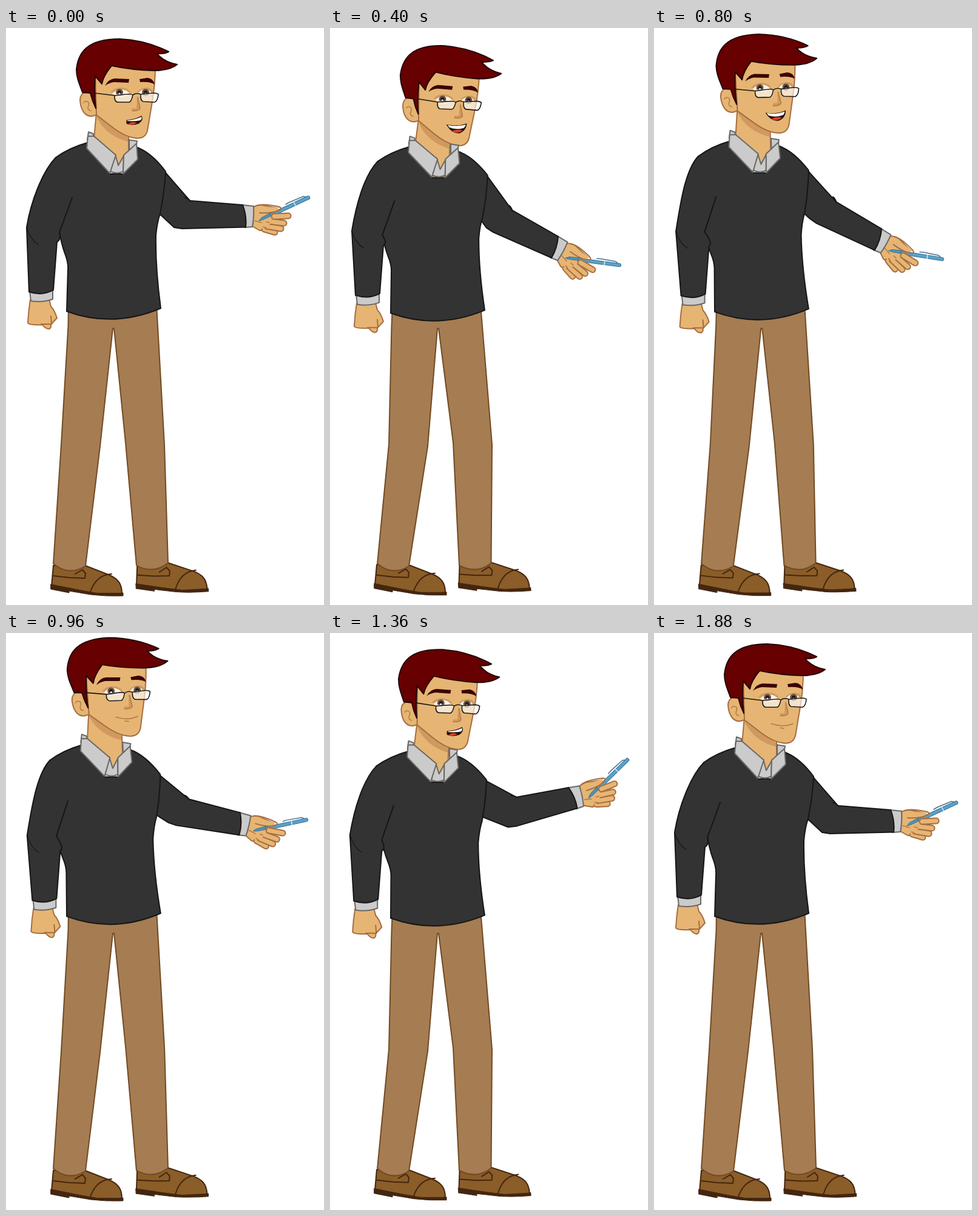
An HTML page for the animation above (1920 ms loop, 524 by 949 pixels).

```html
<!DOCTYPE html>
<html lang="en">
<head>
<meta charset="utf-8">
<title>Presenter</title>
<style>
  html, body { margin: 0; width: 100%; height: 100%; overflow: hidden; background: #fff; }
  svg { display: block; width: 100%; height: 100%; fill: none; stroke-width: 2; stroke-linejoin: round; stroke-linecap: round; }
  .skin { fill: #e6b573; stroke: #a66d40; }
  .patch { fill: #e6b573; }
  .shade { fill: #d0995f; }
  .edge { stroke: #a66d40; }
  .mark { stroke: #b37a48; stroke-width: 1.6; }
  .knit { fill: #333; stroke: #161616; }
  .fold { stroke: #161616; stroke-width: 1.2; }
  .linen { fill: #cbcbcb; stroke: #686868; }
  .cloth { fill: #a67c52; stroke: #714b25; }
  .shoe { fill: #8b5d28; stroke: #432611; }
  .sole { fill: #432611; stroke: #432611; stroke-width: 1; }
  .seam { stroke: #432611; }
  .hair { fill: #670001; stroke: #220606; }
  .brow { fill: #3b0204; }
  .wire { stroke: #1c1816; stroke-width: 1.6; }
  .lip { fill: #210b08; stroke: #210b08; stroke-width: 1.2; }
  .tooth { fill: #fff; }
  .tongue { fill: #d8401f; }
</style>
</head>
<body>
<svg viewBox="0 0 524 949">
  <defs>
    <g id="shoe">
      <path class="shoe" d="M78 884L75 918L104 922L150 930L191 930C191 914 185 905 166 898L130 884Z"/>
      <path class="sole" d="M74 915L104 921L142 929Q170 932 193 929L193 934Q165 935 140 932L104 926L104 929L74 923Z"/>
      <path class="seam" d="M139 927Q149 899 174 898M78 901L104 904L130 905L131 897L126 891L114 898"/>
    </g>
  </defs>

  <g id="shoeL"><use href="#shoe"/></g>
  <g id="shoeR"><use href="#shoe" transform="translate(140 -1) rotate(-3 73 918)"/></g>
  <path id="legs" class="cloth"/>

  <g id="fore">
    <g id="hand">
      <path class="skin" d="M404 297Q411 291 421 291L446 296L448 318L430 333L418 333L404 325Z"/>
      <g id="fingers"></g>
      <path class="patch" d="M406 300L424 294L440 300L438 318L430 329L418 330L406 323Z"/>
      <path class="mark" d="M410 317L421 320M424 327L429 329M429 319L434 320"/>
      <path d="M417 317L421 312L436 304L439 308L424 315Z" fill="#4e93bd" stroke="#39738f" stroke-width="1"/>
      <path d="M438 307L498 279" stroke="#37708f" stroke-width="6.4"/>
      <path d="M438 307L498 279" stroke="#5ba1cb" stroke-width="4.4"/>
      <path d="M474 286L477 292" stroke="#d5e9f5" stroke-width="1.6"/>
      <path d="M461 290L466 287L490 277L494 278" stroke="#456f93" stroke-width="1.5"/>
      <g id="index"></g>
      <path class="patch" d="M424 294L450 295L446 301L430 304L418 304Z"/>
      <path class="edge" d="M413 292Q424 288 450 294Q457 297 447 301Q437 305 418 304"/>
    </g>
    <path class="linen" d="M389 291L408 293Q409 310 406 327L393 328Z"/>
  </g>
  <path id="farArm" class="knit"/>
  <path id="bump" class="knit" d="M295 279Q300 280 304 285"/>

  <g id="head">
    <path class="skin" d="M149 138L145 182L172 236L202 236L202 178Z"/>
    <path class="shade" d="M150 142Q175 167 201 180L201 187Q166 178 150 148Z"/>
    <path class="skin" d="M149 112C137 101 122 104 122 119C123 133 129 146 142 145L152 142Z"/>
    <path class="mark" d="M128 123C130 118 139 121 136 127Q133 135 140 136"/>
    <path class="skin" d="M147 76L172 56L246 60Q246 96 240 127L233 169Q229 183 213 181Q196 179 175 163L149 143Z"/>
    <path class="shade" d="M172 106Q178 97 191 98Q203 99 206 107ZM216 106Q222 98 233 98Q241 99 243 106Z"/>
    <path d="M175 108Q181 101 190 101Q201 102 204 109Q189 117 175 108ZM218 107Q223 100 232 101Q239 103 240 108Q229 115 218 107Z" fill="#faf3ea"/>
    <g id="eyes"></g>
    <path class="shade" d="M216 112L221 133Q218 138 207 135L208 132L215 132Z"/>
    <path class="mark" d="M217 114L221 132Q219 137 208 136"/>
    <path d="M179 109L210 108Q209 122 204 122L184 122Q180 121 179 109ZM221 108L250 107Q250 121 245 122L226 121Q221 119 221 108Z" fill="#fff" fill-opacity=".62"/>
    <path class="wire" d="M146 107L179 111Q178 121 184 122L203 122Q207 121 209 110Q207 108 199 109L179 111M209 110Q215 106 222 109Q221 119 226 121L245 122Q250 120 251 109Q249 107 243 107L222 109"/>
    <path class="brow" d="M163 95Q169 84 179 83L203 84L202 90L178 89Q170 90 163 95ZM220 84L233 82Q243 83 245 93Q238 88 221 89Z"/>
    <g class="mouth">
      <path class="lip" d="M199 152Q213 151 223 145Q227 151 218 157Q207 161 199 157Z"/>
      <path class="tooth" d="M200 152Q213 151 223 146Q225 149 221 152Q211 154 200 153Z"/>
      <path class="tongue" d="M201 158Q208 152 216 156Q208 161 201 158Z"/>
    </g>
    <g class="mouth">
      <path class="mark" d="M193 149Q214 156 229 149M208 156L214 157"/>
    </g>
    <g class="mouth">
      <path class="lip" d="M196 145Q211 150 226 144Q226 153 219 157Q207 161 200 155Q196 151 196 145Z"/>
      <path class="tooth" d="M198 147Q211 151 224 147Q224 152 218 156Q207 159 201 154Z"/>
      <path d="M200 152Q212 156 223 150" stroke="#c9c4c0" stroke-width="1"/>
    </g>
    <g class="mouth">
      <path class="lip" d="M196 148Q213 151 228 145Q227 156 218 160Q206 163 196 148Z"/>
      <path class="tooth" d="M197 148Q213 151 227 146Q226 150 224 152Q212 156 200 152Z"/>
      <path class="tongue" d="M204 158Q213 153 222 156Q215 163 204 158Z"/>
    </g>
    <g class="mouth">
      <path class="lip" d="M196 147Q213 150 227 145Q226 155 219 160Q206 164 196 147Z"/>
      <path class="tooth" d="M197 148Q213 151 226 146Q225 149 223 151Q212 154 200 151Z"/>
      <path class="tongue" d="M203 156Q212 153 222 155L218 159Q209 161 203 156Z"/>
      <path class="tooth" d="M205 158Q213 156 220 158Q212 163 205 158Z"/>
    </g>
    <path class="hair" d="M148 132Q142 120 139 107L126 106C121 92 116 82 116 68C119 40 134 18 187 18Q231 20 268 39Q260 43 249 42Q260 56 282 60Q270 70 244 70Q206 69 174 62Q160 79 158 92L147 79Q145 108 148 132Z"/>
  </g>

  <g id="torso">
    <path class="knit" d="M136 188Q104 197 82 213L88 335Q91 354 97 371Q103 386 102 398L100 466Q176 494 255 461Q246 394 247 341Q249 320 254 305Q261 272 263 236Q240 205 215 196L193 240L172 240Z"/>
    <path class="linen" d="M180 208L185 226L194 210L193 236Q183 241 172 236Z"/>
    <path class="linen" d="M136 171L144 174L144 179L134 184ZM203 184L216 186L215 191L203 201Z"/>
    <path class="linen" d="M135 178L145 178L181 209L171 239L133 198ZM215 190L194 209L193 240L217 216Z"/>
  </g>

  <g id="cuffed">
    <path class="skin" d="M40 447Q37 465 36 485Q38 489 60 488Q65 495 71 495Q75 493 74 488L84 477Q80 464 74 458L71 446Z"/>
    <path class="edge" d="M74 474L75 487M58 487L73 487"/>
    <path class="linen" d="M39 432L77 430L77 446Q60 452 41 449Z"/>
  </g>
  <path id="nearArm" class="knit"/>
  <path id="nearFold" class="fold"/>
</svg>
<script>
const LOOP = 1920, STEP = 40, SWAY = LOOP - STEP;
const $ = id => document.getElementById(id);
const set = (id, name, value) => $(id).setAttribute(name, value);

// one digit per beat: 0 open, 1 closed, 2 grin, 3 laugh, 4 wide
const speech = '013233140141';
const mouths = document.querySelectorAll('.mouth');

function finger(x1, y1, x2, y2) {
  const d = `M${x1} ${y1}L${x2} ${y2}`;
  return `<path class="edge" d="${d}" stroke-width="11"/><path d="${d}" stroke="#e6b573" stroke-width="7"/>`;
}
$('fingers').innerHTML = finger(426, 331, 443, 336) + finger(430, 326, 453, 330) + finger(434, 318, 458, 321);
$('index').innerHTML = finger(442, 310, 465, 309);

$('eyes').innerHTML = [187, 230].map(x =>
  `<circle cx="${x}" cy="106" r="6" fill="#665445"/><circle cx="${x}" cy="106" r="3" fill="#1d1511"/>
   <circle cx="${x}" cy="108" r="1.5" fill="#fff"/>`).join('');

// all motion is a sway with one overtone
function poseAt(t) {
  const p = 2 * Math.PI * t / SWAY;
  const wave = (mean, c1, c2, s1, s2) =>
    mean + c1 * Math.cos(p) + c2 * Math.cos(2 * p) + s1 * Math.sin(p) + s2 * Math.sin(2 * p);
  const lean = wave(-5.6, 5.6, 0, 0, 0);
  const nod = wave(2.3, 5, -7.3, 0, .9);
  const aim = wave(6.8, -6.1, -.7, 22, -5.4);
  const drop = wave(7.7, -4.4, -3.3, 46.9, -9.5);
  const bend = Math.max(0, Math.min(1, (nod - .9 * lean) / 8));
  return { lean, nod, aim, drop, bend };
}

function draw(t) {
  const { lean, nod, aim, drop, bend } = poseAt(t);
  const top = .45 * nod + 2.5 * bend, hem = 3 * bend;
  const reach = -.65 * aim - .009 * aim * aim;
  const fx = .09 * aim - .4 * lean, fy = 3.5 * bend - .5 * lean;

  // torso leans and squashes linearly between collar and hem
  const body = (x, y) => [x + lean * (466 - y) / 295, y + (top * (466 - y) + hem * (y - 171)) / 295];
  const rad = aim * Math.PI / 180, cos = Math.cos(rad), sin = Math.sin(rad);
  const fore = (x, y) => [392 + reach + (x - 392) * cos - (y - 309) * sin, 309 + drop + (x - 392) * sin + (y - 309) * cos];
  const fist = (x, y) => [x + fx, y + fy];

  set('torso', 'transform', `matrix(1 0 ${-lean / 295} ${1 + (hem - top) / 295} ${lean * 466 / 295} ${(466 * top - 171 * hem) / 295})`);
  set('head', 'transform', `translate(${lean} ${nod}) rotate(${nod * .22} 170 175)`);

  set('shoeL', 'transform', `translate(${-bend} ${-1.3 * bend})`);
  set('shoeR', 'transform', `translate(${-2.6 * bend} ${-1.2 * bend})`);
  const knee = 6 * bend;
  set('legs', 'd', `M103 455L${102.5 - bend} 490L${91 + knee} 685L78 881Q103 902 ${131 - bend} 885L${155 + knee} 688
    L${176 + bend} 494L${178 + bend} 494L${197 + knee} 682L${215 - 2 * bend} 884Q242 899 ${267 - 1.5 * bend} 880L${261 + knee} 685L248 455Z`);

  const swing = `translate(${reach} ${drop}) rotate(${aim} 392 309)`;
  set('fore', 'transform', swing);
  set('bump', 'transform', swing);
  set('hand', 'transform', `rotate(${aim * .3} 407 310)`);
  set('farArm', 'd', `M${body(212, 195)}Q${body(240, 206)} ${body(263, 238)}L${fore(303, 284)}L${fore(390, 291)}
    Q${fore(397, 309)} ${fore(395, 327.5)}L${fore(290, 330)}L${fore(277, 328)}L${body(236, 290)}Z`);

  const [sx, sy] = body(82, 213), elbow = [34 + .08 * aim, 328 + .75 * fy + .06 * aim];
  set('cuffed', 'transform', `translate(${fx} ${fy})`);
  set('nearArm', 'd', `M${sx} ${sy}C${sx - 22} ${sy + 23} ${elbow[0] + 7} ${elbow[1] - 43} ${elbow}L${fist(38, 434)}
    Q${fist(60, 441)} ${fist(78, 431)}L${fist(84, 352)}Q${fist(91, 348)} ${body(88, 336)}L${body(109, 279)}`);
  set('nearFold', 'd', `M${elbow}q6 20 19 28`);

  const said = +speech[Math.floor(t / LOOP * speech.length)];
  mouths.forEach((m, i) => { m.style.display = i === said ? '' : 'none'; });
}

const start = performance.now();
function tick() {
  const t = (performance.now() - start) % LOOP;
  draw(Math.floor(t / STEP) * STEP);
  requestAnimationFrame(tick);
}
draw(0);
requestAnimationFrame(tick);
</script>
</body>
</html>
```
